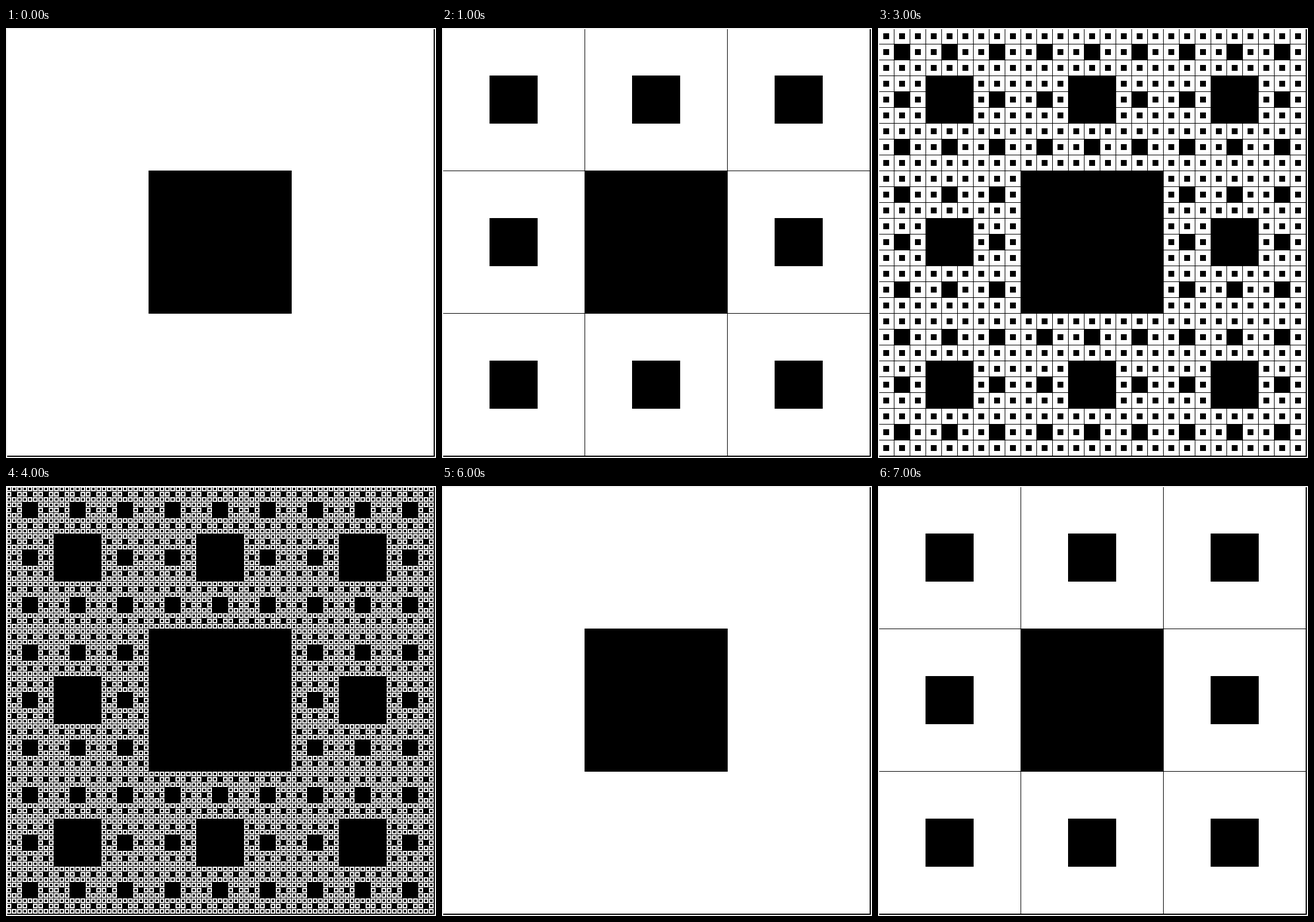
Recreate the animation shown at these times as an HTML page. Size 733 by 733 pixels, loop 8000 ms.

```html
<!DOCTYPE html>
<html lang="en">
<head>
<meta charset="utf-8">
<title>Square carpet</title>
<style>
  html, body { margin: 0; width: 100%; height: 100%; overflow: hidden; background: #f0f0f0; }
  svg { display: block; }
</style>
</head>
<body>
<svg width="733" height="733" viewBox="0 0 733 733" shape-rendering="crispEdges">
  <defs><clipPath id="field"><rect x="2" y="2" width="729" height="729"/></clipPath></defs>
  <rect width="733" height="733" fill="#f0f0f0"/>
  <g clip-path="url(#field)">
    <rect width="731" height="731" fill="#fff"/>
    <path id="carpet"/>
    <path d="M729 0h2v731H0v-2h729z"/>
  </g>
</svg>
<script>
const SIZE = 729, DEPTH = 6, STEP = 1000, LOOP = 8000;
const carpet = document.getElementById('carpet');

const box = (x, y, w, h) => `M${x} ${y}h${w}v${h}h${-w}z`;

// Middle squares of every cell; each includes its far edge pixel.
function holes(cell) {
  const third = cell / 3;
  let d = '';
  for (let y = third; y < SIZE; y += cell)
    for (let x = third; x < SIZE; x += cell) d += box(x, y, third + 1, third + 1);
  return d;
}

function grid(cell) {
  let d = '';
  for (let p = cell; p < SIZE; p += cell) d += box(p, 0, 1, SIZE) + box(0, p, SIZE, 1);
  return d;
}

const levels = [];
let solid = '';
for (let i = 0; i < DEPTH; i++) {
  const cell = SIZE / 3 ** i;
  // At the last level the cell outlines and holes fill the whole field.
  if (i === DEPTH - 1) {
    levels.push(box(0, 0, SIZE, SIZE));
  } else {
    solid += holes(cell);
    levels.push(solid + grid(cell));
  }
}

let shown = -1;
function draw(time) {
  const level = Math.floor((time % LOOP) / STEP) % DEPTH;
  if (level === shown) return;
  shown = level;
  carpet.setAttribute('d', levels[level]);
}

const start = performance.now();
function tick() {
  draw(performance.now() - start);
  requestAnimationFrame(tick);
}
tick();
</script>
</body>
</html>
```
